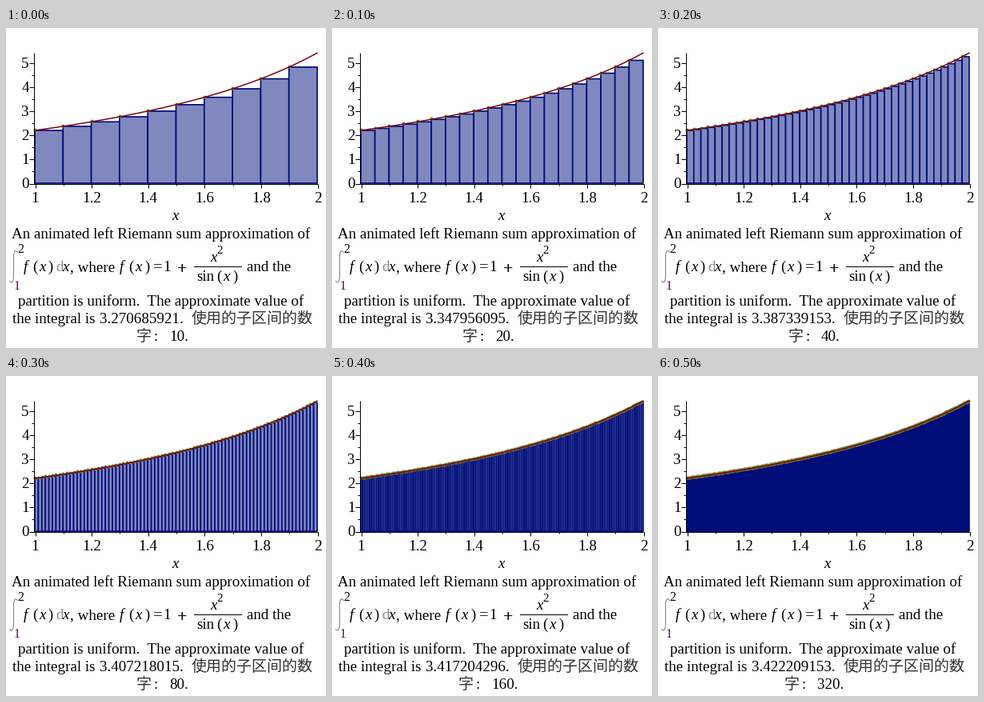
A matplotlib script for the animation above (0.6 s loop, 400 by 400 pixels).

```python
import numpy as np
import matplotlib.pyplot as plt
from matplotlib.animation import FuncAnimation
from matplotlib.collections import LineCollection, PolyCollection
from matplotlib.patches import PathPatch
from matplotlib.path import Path

SIZE, DPI = 400, 100
PX = 72 / DPI  # points per pixel
EM = 19
NAVY, FILL, RED, OLIVE = "#000c78", "#8088be", "#78000e", "#6f8030"
AXIS_X, AXIS_Y = 34.5, 194.5
# Subinterval counts with their sums in ten-digit arithmetic
STEPS = [(10, "3.270685921"), (20, "3.347956095"), (40, "3.387339153"),
         (80, "3.407218015"), (160, "3.417204296"), (320, "3.422209153")]

fig = plt.figure(figsize=(SIZE / DPI, SIZE / DPI), dpi=DPI, facecolor="white")
ax = fig.add_axes([0, 0, 1, 1])
ax.set(xlim=(0, SIZE), ylim=(SIZE, 0))
ax.axis("off")


def f(x):
    return 1 + x ** 2 / np.sin(x)


def to_x(x):
    return 36 + 353 * (x - 1)


def to_y(y):
    return 194 - 30.15 * y


def write(x, y, text, size=EM, color="black", ha="left",
          font="Liberation Serif", **style):
    return ax.text(x, y, text, fontsize=size * PX, color=color, ha=ha,
                   va="baseline", family=font, **style)


def write_cjk(x, y, text):
    return write(x, y, text, font="Noto Sans CJK JP", weight="light", color="#333333")


def draw_axes():
    lines = [[(AXIS_X, 31), (AXIS_X, AXIS_Y)], [(AXIS_X, AXIS_Y), (389.5, AXIS_Y)]]
    for i in range(11):
        major = i % 2 == 0
        x, y = to_x(1 + i / 10) + 0.5, to_y(i / 2) + 0.5
        lines.append([(x, AXIS_Y), (x, 200 if major else 197)])
        lines.append([(29 if major else 32, y), (AXIS_X, y)])
        if major:
            write(x, 218, f"{1 + i / 10:g}", ha="center")
            write(24, y + 6, str(i // 2), ha="center")
    ax.add_collection(LineCollection(lines, colors="black", linewidths=PX, zorder=5))
    write(211, 240, "x", style="italic", ha="center")


def draw_integral_sign():
    points = [(14.5, 281), (13, 277), (9.5, 278), (9.5, 286), (9.5, 310),
              (9.5, 318), (6.5, 320), (4.5, 316)]
    codes = [Path.MOVETO] + [Path.CURVE4] * 3 + [Path.LINETO] + [Path.CURVE4] * 3
    ax.add_patch(PathPatch(Path(points, codes), fill=False,
                           edgecolor="#8c8c8c", linewidth=1.2 * PX))


def write_call(x, y, name, name_width):
    write(x, y, name, style="italic" if name == "f" else "normal")
    x += name_width
    write(x, y, "(")
    write(x + 8, y, "x", style="italic")
    write(x + 19.5, y, ")")


def draw_caption():
    write(7, 263, "An animated left Riemann sum approximation of")
    draw_integral_sign()
    write(14, 281, "2", size=16)
    write(10, 327, "1", size=16, color="#5a0a50")
    write_call(22, 304, "f", 11)
    write(62.5, 304, "d", color="#888888")
    write(70.5, 304, "x", style="italic")
    write(79.5, 304, ", where")
    write_call(142, 304, "f", 11.5)
    write(184, 304, "=", size=21)
    write(196, 304, "1")
    write(214, 307, "+", size=22, weight="bold")
    write(255.5, 292, "x", style="italic")
    write(263, 282, "2", size=15)
    ax.plot([234.5, 294], [297.5, 297.5], color="black", lw=PX)
    write_call(238.5, 316, "sin", 25)
    write(301, 304, "and the")
    write(15, 347, "partition is uniform.  The approximate value of")
    write(8, 369, "the integral is")
    write_cjk(231.5, 369, "使用的子区间的数")


draw_axes()
draw_caption()

bars = PolyCollection([], facecolors=FILL, edgecolors=NAVY,
                      linewidths=1.7 * PX, zorder=2, snap=False)
ax.add_collection(bars)
dots, = ax.plot([], [], "o", ms=4 * PX, mfc=OLIVE, mec="none", zorder=3, snap=False)
curve_x = np.linspace(1, 2, 200)
ax.plot(to_x(curve_x), to_y(f(curve_x)), color=RED, lw=1.5 * PX, zorder=4)

value_text = write(117.5, 369, "")
char_text = write_cjk(163, 391, "字")
colon_text = write(184, 391, ":")
count_text = write(204, 391, "")


def update(i):
    n, value = STEPS[i]
    left = 1 + np.arange(n) / n
    x0, x1 = to_x(left), to_x(left + 1 / n)
    top, base = to_y(f(left)), to_y(0)
    bars.set_verts([[(a, base), (a, t), (b, t), (b, base)]
                    for a, b, t in zip(x0, x1, top)])
    dots.set_data(x0, top - 0.8)

    value_text.set_text(f"{value}.")
    count_text.set_text(f"{n}.")
    start = 162.5 - EM / 4 * (len(str(n)) - 2)
    for text, offset in ((char_text, 0), (colon_text, 21.5), (count_text, 41.5)):
        text.set_x(start + offset)
    return bars, dots, value_text, char_text, colon_text, count_text


anim = FuncAnimation(fig, update, frames=len(STEPS), interval=100,
                     repeat=True, repeat_delay=0, blit=False)
plt.show()
```
